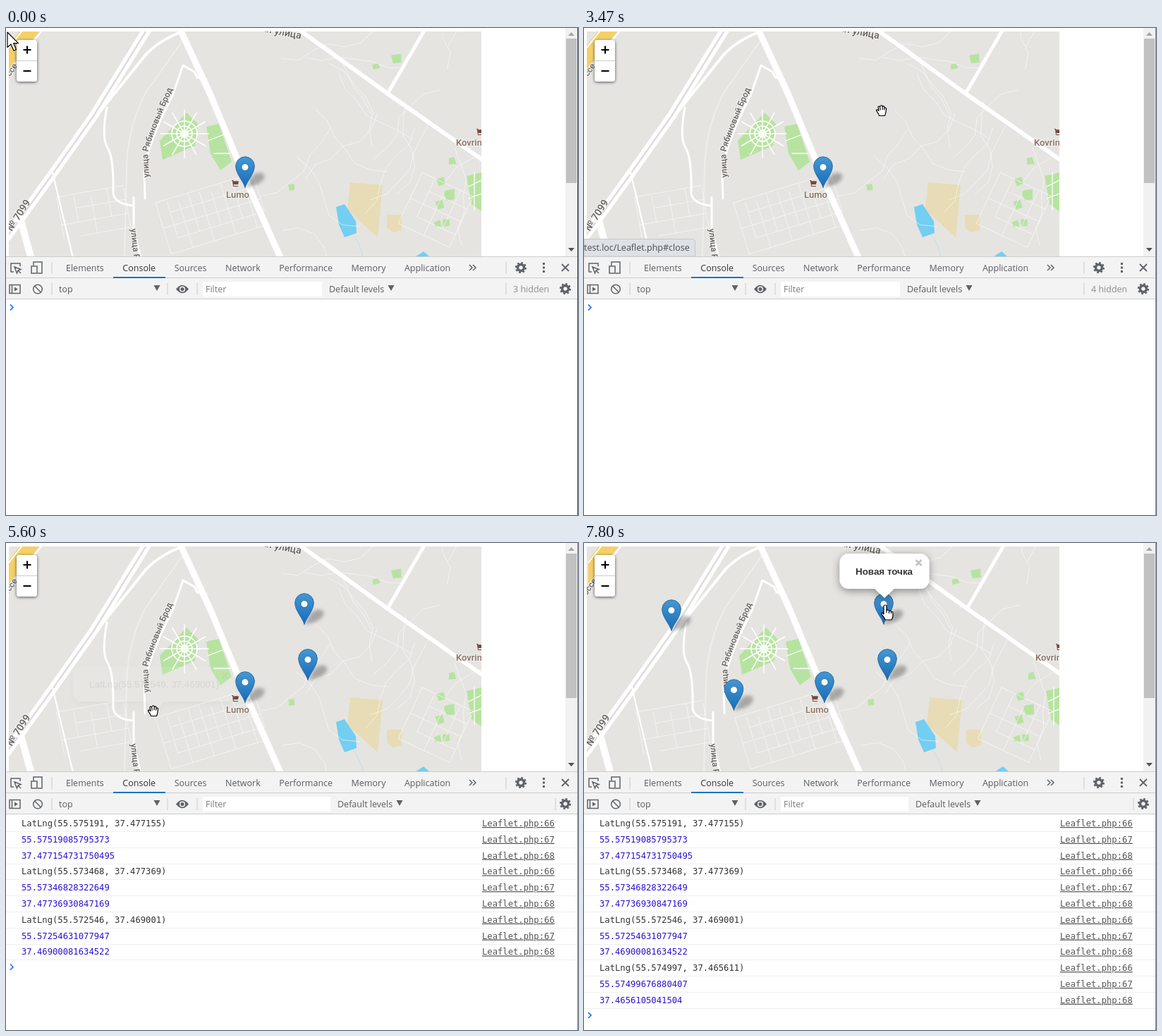
Write an HTML page that moves like this. It is 811 by 691 pixels and loops after 8 s.

```html
<!DOCTYPE html>
<html lang="ru">
<head>
<meta charset="utf-8">
<title>Map markers</title>
<style>
html, body { margin: 0; width: 100%; height: 100%; overflow: hidden; background: #fff; }
svg { display: block; font: 12.5px "Open Sans", "Noto Sans", sans-serif; fill: #5a5c60; }
text { white-space: pre; }
.line { fill: none; stroke: #fff; stroke-linejoin: round; stroke-linecap: round; }
.thin { stroke-width: 1; opacity: .55; }
.label { font: 500 12px Roboto, sans-serif; fill: #66625f; stroke: #f2f1ee; stroke-width: 2; paint-order: stroke; }
.big { font-size: 14px; }
.shop { font-size: 13px; fill: #8a6f66; }
.popup text { font: 13.4px "Liberation Sans", Arial, sans-serif; fill: #333; }
.popup .title { font-weight: bold; }
.log { font: 12.2px "DejaVu Sans Mono", monospace; fill: #303336; }
.log .num { fill: #2b12d2; }
.log .src { fill: #555; text-decoration: underline; }
.icon { fill: none; stroke: #5f6368; stroke-width: 1.5; }
.sep { stroke: #ccc; }
.cur { fill: #fff; stroke: #000; stroke-width: 1.2; stroke-linejoin: round; }
</style>
</head>
<body>
<svg id="stage" width="811" height="691" viewBox="0 0 811 691"></svg>
<script>
const stage = document.getElementById('stage');
const range = n => [...Array(n).keys()];
const line = (d, w, extra = '') => `<path class="line" d="${d}" stroke-width="${w}" ${extra}/>`;
const fill = (d, c) => `<path d="${d}" fill="${c}"/>`;
const text = (x, y, s, extra = '') => `<text x="${x}" y="${y}" ${extra}>${s}</text>`;
const turned = (x, y, angle, s, cls = '') =>
  text(0, 0, s, `class="label ${cls}" transform="translate(${x} ${y}) rotate(${angle})"`);
const sep = (x, y) => `<path class="sep" d="M${x} ${y - 8}v17"/>`;

let seed = 7;
const random = (a, b) => {
  seed = seed * 16807 % 2147483647;
  return a + (b - a) * seed / 2147483647;
};

// A tilted block of small streets
function grid(x, y, angle, cols, rows, dx, dy) {
  const d = range(cols + 1).map(i => `M${i * dx} ${i % 3 * 4}V${rows * dy - i % 2 * dy}`).join('') +
    range(rows + 1).map(j => `M${j % 2 * dx} ${j * dy}H${cols * dx}`).join('');
  return `<path class="line thin" transform="translate(${x} ${y}) rotate(${angle})" d="${d}"/>`;
}

// A footpath that wanders with slowly changing direction
function footpath(x, y) {
  let angle = random(0, 6.3), d = `M${x} ${y}`;
  for (const i of range(6)) {
    angle += random(-.7, .7);
    d += `l${Math.cos(angle) * 24} ${Math.sin(angle) * 24}`;
  }
  return d;
}

// A small four-cornered lawn
const lawn = (x, y, r) => 'M' + range(4).map(i => {
  const a = i * 1.57 + random(.3, .9);
  return `${x + r * Math.cos(a)} ${y + r * Math.sin(a)}`;
}).join('L') + 'Z';

const cart = (x, y) => `<path transform="translate(${x} ${y})" fill="#74483c"
  d="M-5-4h2l.6 1.200H5L4 2h-6.300v2H4v1h-7L-4-3h-1z"/>`;

const parks = 'M218 160L256 120 272 136 268 167 222 187Z M284 140L302 136 320 190 304 202 290 178Z M653 210l21-5v55l-14-10z' +
  lawn(525, 55, 6) + lawn(554, 43, 9) + lawn(405, 226, 6) + lawn(629, 236, 10) +
  range(6).map(() => lawn(random(598, 648), random(184, 284), random(4, 8))).join('');
const circlePaths = [5, 11, 18].map(r => `<circle class="line" cx="253" cy="150" r="${r}" stroke-width="1.700"/>`).join('') +
  range(12).map(i => `<path class="line" d="M253 150h34" stroke-width="1.500" transform="rotate(${i * 30} 253 150)"/>`).join('');

const highway = 'M200 2L124 125 66 207 22 268 0 298';
const map = `<rect width="680" height="330" x="-4" fill="#e5e4e1"/>
  ${fill('M19 5H47L4 58V25Z', '#f4d067')}${line('M50 5L4 62M22 5L4 28', 2)}
  ${fill(parks, '#b7e3a0')}${circlePaths}
  ${line('M286 160l26-10M295 178h23M656 225l18-9M656 242l18-7M664 205v53', 1.3)}
  ${fill('M488 219L534 223 527 297 484 258Z M540 265h21v22l-13 3-8-7z', '#e7dcb5')}
  <path class="line" d="M492 293Q502 306 506 324" style="stroke:#c2dfec"/>
  ${fill('M468 254l12-4 16 24 1 17-17 6-8-18zM580 325l12-8 9 8z', '#73cef2')}
  <path class="line thin" d="${range(18).map(() => footpath(random(350, 650), random(20, 310))).join('')}"/>
  ${grid(212, 248, -17, 9, 4, 16, 19)}${grid(72, 240, -10, 4, 3, 24, 20)}${grid(590, 205, 25, 4, 4, 20, 20)}
  ${line('M250 18L198 92Q172 142 171 200L168 324', 2, 'opacity=".35"')}
  ${line('M250 5Q218 17 198 38L124 130', 4)}
  ${line(highway, 13)}<path class="line" d="${highway}" style="stroke:#dedddd" stroke-width="2.500"/>
  ${line('M18 262L36 328', 10)}${line('M66 205L95 326', 2.2)}
  ${line('M143 113Q135 156 144 170T152 235Q155 250 181 252M181 240V285L191 326', 3)}
  ${line('M197 242L196 205Q200 165 236 96L251 53 267 62 271 70 284 73', 3)}
  ${line('M247 2L290 95 345 227 391 330', 9)}
  ${line('M412 0L541 93 678 189', 6)}${line('M541 93L594 2', 5)}
  <path id="street" d="M203 212L201 178Q205 155 241 76" fill="none"/>
  <text class="label"><textPath href="#street">улица Рябиновый Брод</textPath></text>
  ${turned(177, 285, 84, 'улица Рябиновый Брод')}${turned(338, 0, 11, 'ровая улица', 'big')}
  ${turned(8, 289, -57, '№ 7099', 'big')}${turned(-4, 83, -55, 'шоссе')}
  ${cart(325, 220)}${text(312, 241, 'Lumo', 'class="label shop"')}
  ${cart(672, 147)}${text(638, 167, 'Kovrinka', 'class="label shop"')}`;

// Clicks on the map: each adds a marker, a popup and three console rows
const clicks = [
  { at: 3730, x: 423, y: 116, lat: 55.57519085795373, lng: 37.477154731750495 },
  { at: 4800, x: 428, y: 195, lat: 55.57346828322649, lng: 37.47736930847169 },
  { at: 5585, x: 210.5, y: 238, lat: 55.57254631077947, lng: 37.46900081634522 },
  { at: 6240, x: 122, y: 125, lat: 55.57499676880407, lng: 37.4656105041504 }
];
const latLng = c => `LatLng(${c.lat.toFixed(6)}, ${c.lng.toFixed(6)})`;
const markers = [{ at: -100, x: 339, y: 227 }, ...clicks];
const popups = [
  { at: 1130, end: 3200, fade: 200, x: 339.5, y: 188, w: 115, title: 'Заголовок', body: 'Сам текст' },
  ...clicks.map((c, i) => ({ ...c, end: clicks[i + 1]?.at ?? 7600, w: 230, body: latLng(c) })),
  { at: 7600, end: 8000, x: 424, y: 78, w: 127, title: 'Новая точка' }
];

const pin = ({ x, y }) => `<g class="pin" transform="translate(${x} ${y})">
  <path d="M0 0L9-16Q19-25 27-19 29-10 15-4Z" opacity=".27" fill="#000" filter="url(#blur)"/>
  <path d="M0-.5C-2-9-13.300-20-13.300-31A13.300 13.300 0 0 1 13.300-31C13.300-20 2-9 0-.5Z" fill="url(#blue)" stroke="#2a6ca6"/>
  <circle cy="-29.500" r="5" fill="#fff" stroke="#2f76b3"/></g>`;

function popup({ x, y, w, title, body }) {
  const h = title && body ? 68 : 50, left = x - w / 2, top = y - h - 13;
  return `<g class="popup"><g filter="url(#shadow)" fill="#fff"><rect x="${left}" y="${top}" width="${w}" height="${h}" rx="13"/>
    <path d="M${x - 14} ${y - 13.5}h28L${x} ${y}Z"/></g>
    <path d="M${left + w - 19} ${top + 9}l8 8m0-8l-8 8" stroke="#c3c3c3" stroke-width="2.500"/>
    ${title ? text(left + 22.5, top + 29.5, title, 'class="title"') : ''}
    ${body ? text(left + 22.5, top + h - 20.5, body) : ''}</g>`;
}

const rows = clicks.map((c, k) => '<g class="log">' + [latLng(c), c.lat, c.lng].map((s, i) => {
  const n = k * 3 + i, y = 402 + n * 22.8;
  return text(22, y, s, i ? 'class="num"' : '') + text(675, y, 'Leaflet.php:' + (66 + i), 'class="src"') +
    `<path d="M0 ${Math.round(y + 7) + .5}H810" stroke="#efefef"/>`;
}).join('') + '</g>').join('');

const gear = (x, y) => `<g transform="translate(${x} ${y})" stroke="#5f6368" fill="none">
  <circle r="4.500" stroke-width="3.400"/><circle r="6.700" stroke-width="2.800" stroke-dasharray="2.630"/></g>`;
const arrowDown = (x, y) => fill(`M${x - 4.5} ${y - 4}h9l-4.500 8z`, '#5f6368');
const tabs = ['Elements', 'Console', 'Sources', 'Network', 'Performance', 'Memory', 'Application'].map((s, i) =>
  `<tspan dx="${i && 26.5}" ${i === 1 ? 'fill="#333"' : ''}>${s}</tspan>`).join('');
const filterBar = w => `<rect x="279" y="360" width="${w}" height="21" fill="#fff"/>
  ${text(283, 375, 'Filter', 'fill="#7b7b7b"')}${text(w + 289, 375, 'Default levels')}${arrowDown(w + 377, 369)}`;

const devtools = `<rect y="324" width="811" height="367" fill="#fff"/><rect y="324" width="811" height="60" fill="#f3f3f3"/>
  <path d="M0 354.500H811M0 384.500H811M0 324.500H811" stroke="#cdcdcd"/>
  <g class="icon"><path d="M11 346H7V334H20V338M12 339L21 342.500 17 344 15.500 348ZM17 344l4 4"/>
  <path d="M39 337V332H51V348H45M36 338h8v10h-8z"/>
  <path d="M5 364.500h15v12H5zM8.500 364v12"/><circle cx="45" cy="370.500" r="6.300"/><path d="M40.500 366l9 9"/>
  <path d="M657 336l4 4-4 4M662 336l4 4-4 4"/><path d="M788 335l10 10m0-10l-10 10" stroke-width="1.800"/></g>
  ${fill('M12 367.500l5 3-5 3z', '#5f6368')}
  ${range(3).map(i => `<rect x="761" y="${333 + i * 5.5}" width="3" height="3" fill="#5f6368"/>`).join('')}
  <path d="M241 370.500Q250 359 259 370.500 250 382 241 370.500Z" fill="#5f6368"/>
  <circle cx="250" cy="370.500" r="3.300" fill="#5f6368" stroke="#f3f3f3" stroke-width="1.500"/>
  ${text(85, 345, tabs)}<rect x="152" y="353" width="74" height="2" fill="#1a73c8"/>
  ${gear(730, 340)}${gear(793, 370)}${arrowDown(214, 369)}${text(75, 375, 'top')}
  ${sep(65, 340)}${sep(709, 340)}${sep(65, 370)}${sep(229, 370)}${sep(271, 370)}
  <g id="quiet">${filterBar(169)}${sep(709, 370)}<text id="hidden" x="719" y="375" fill="#8d8d8d"></text></g>
  <g id="logged">${filterBar(181)}${sep(779, 370)}</g>
  ${rows}<path id="prompt" d="M6 392.500l4 4-4 4" fill="none" stroke="#367cf1" stroke-width="1.800"/>`;

const scrollbar = `<rect x="793" width="18" height="324" fill="#f1f1f1"/><rect x="794" y="15" width="15" height="205" fill="#c1c1c1"/>
  ${fill('M797 11l4.500-5 4.500 5z', '#a3a3a3')}${fill('M797 312l4.500 5 4.500-5z', '#505050')}`;
const zoom = `<rect x="15" y="17" width="29" height="59" rx="4" fill="#fff" filter="url(#small)"/>
  <path d="M15 46.500h29" stroke="#ccc"/><path d="M24.500 31h11M30 25.500v11M24.500 61h11" stroke="#000" stroke-width="2"/>`;
// Arrow, pointing hand, open hand
const cursors = `<g id="cursor"><path class="cur" d="M0 0V21.500L5 17 9 26 12.500 24.500 8.700 15.700H15.500Z"/>
  <path class="cur" d="M-2 2A2 2 0 0 1 2 2V7.500Q4.500 6 5.500 8.500 8 7.500 8.500 9.500 11 9 11 11.500V15Q11 18 9 21H0Q-1 18-5 13.500-6 11-3.800 11L-2 13ZM2 7.500V11M5.500 8.500V12M8.500 9.500V12"/>
  <path class="cur" d="M-3.500 7.500C-4 4-7.500 1.500-7.500-.5Q-6-2-4 .5L-5-5Q-4-7-2.500-5L-1.500-6.500Q-.3-8 1-6.500L1.500-5.500Q3-7 4-5V-3.500Q6-4.500 6.600-2.700L6 2Q5.500 5 4.500 7.500ZM-2.500-5L-1.700-.5M1.200-6V-1M4-4.500L3.700-.5"/></g>`;

stage.innerHTML = `<defs>
  <clipPath id="view"><rect x="4" y="5" width="670" height="319"/></clipPath>
  <linearGradient id="blue" x2="0" y2="1"><stop stop-color="#4598d2"/><stop offset="1" stop-color="#176bb8"/></linearGradient>
  <filter id="blur" x="-50%" y="-50%" width="200%" height="200%"><feGaussianBlur stdDeviation="2.500"/></filter>
  <filter id="shadow" x="-20%" y="-30%" width="140%" height="170%"><feDropShadow dx="0" dy="3" stdDeviation="6" flood-opacity=".4"/></filter>
  <filter id="small" x="-30%" y="-20%" width="160%" height="140%"><feDropShadow dx="0" dy="1" stdDeviation="2" flood-opacity=".65"/></filter></defs>
  <rect width="811" height="691" fill="#fff"/>
  <g clip-path="url(#view)"><g id="pan">${map}${markers.map(pin).join('')}${popups.map(popup).join('')}</g>${zoom}</g>
  ${scrollbar}<g id="status"><path d="M0 299.500H153Q157.500 299.500 157.500 304V324H0Z" fill="#dee1e6" stroke="#c3c6ca"/>
  ${text(0, 316, 'test.loc/Leaflet.php#close', 'fill="#4a4d51"')}</g>${devtools}<path id="edge" d="M810.500 0V691"/>${cursors}`;

const $ = id => document.getElementById(id);
const all = s => [...stage.querySelectorAll(s)];
const pins = all('.pin'), bubbles = all('.popup'), logs = all('.log'), shapes = all('.cur');
const clamp = v => Math.max(0, Math.min(1, v));
const show = (el, v) => el.setAttribute('opacity', +v);

// Pointer journeys: start, end, x, y of the goal, sideways bow
const moves = [
  [70, 870, 337.5, 204], [1730, 2530, 394, 120, 30], [2600, 2800, 383, 118], [3230, 3470, 422, 117],
  [4130, 4600, 427, 196], [4980, 5400, 209, 238], [5700, 6000, 122, 125], [6270, 6930, 427, 98], [7140, 7200, 427, 88]
];
function pointer(t) {
  let x = 2, y = 6;
  for (const [start, end, toX, toY, bow = 0] of moves) {
    const k = clamp((t - start) / (end - start));
    x += (toX - x) * k + bow * Math.sin(Math.PI * k);
    y += (toY - y) * k;
  }
  return [x, y];
}

function draw(t) {
  $('pan').setAttribute('transform', `translate(${2 * clamp((t - 6240) / 120)} 0)`);
  markers.forEach((m, i) => show(pins[i], t >= m.at + 60));
  popups.forEach(({ at, end, fade = 1 }, i) =>
    show(bubbles[i], Math.min(clamp((t - at) / 190), 1 - clamp((t - end) / fade))));
  const done = clicks.filter(c => t >= c.at).length;
  logs.forEach((g, i) => show(g, i < done));
  $('prompt').setAttribute('transform', `translate(0 ${done * 68.4})`);
  show($('quiet'), !done);
  show($('logged'), done > 0);
  $('hidden').textContent = (t < 1070 ? 3 : 4) + ' hidden';
  $('edge').setAttribute('stroke', t < 1070 ? '#4c4c4c' : '#8c8c8c');
  show($('status'), t < 3730 && clamp((t - 2600) / 200));
  const overLink = t >= 870 && t < 1800 || t >= 2560 && t < 3280 || t >= 7200;
  const kind = t < 100 ? 0 : overLink ? 1 : 2;
  shapes.forEach((s, i) => show(s, i === kind));
  $('cursor').setAttribute('transform', `translate(${pointer(t)})`);
}

function tick() {
  draw(performance.now() % 8000);
  requestAnimationFrame(tick);
}
tick();
</script>
</body>
</html>
```
